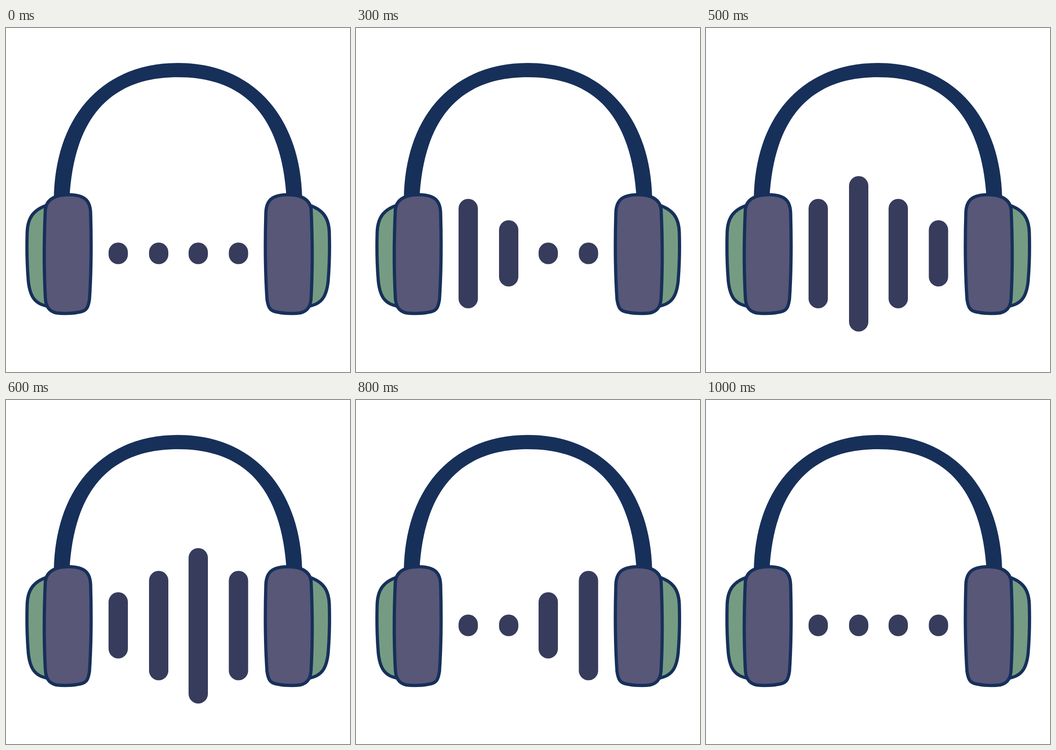
Write an HTML page that moves like this. It is 748 px wide and 748 px high and loops after 1200 ms.

```html
<!DOCTYPE html>
<html lang="en">
<head>
<meta charset="utf-8">
<title>Headphones</title>
<style>
  html, body { margin: 0; width: 100%; height: 100%; overflow: hidden; background: #fff; }
  svg { display: block; width: 100%; height: 100%; }
</style>
</head>
<body>
<svg viewBox="0 0 748 748">
  <path fill="#17305a" d="M104 370C107 188 213 76 374 76S640 190 644 370H610C600 209 533 107 374 107S147 209 138 370Z"/>
  <g id="side" stroke="#17305a" stroke-width="7" stroke-linejoin="round">
    <path fill="#759c82" d="M90 385C60 395 47 412 46 445C45 480 46 520 48.500 550C52 584 63 601 92 605Z"/>
    <path fill="#585778" d="M85.500 395C88 372 108 362.500 137 362.500C166 363 183 371 184 402C186 470 185.500 530 181.500 590C179 606 176 614 163 617C146 621 124 621.500 109 619.500C91 615 86 602 85.500 585C82 520 83 450 85.500 395Z"/>
  </g>
  <use href="#side" transform="translate(749 0) scale(-1 1)"/>
  <g id="bars" fill="#373c5c"></g>
</svg>
<script>
  const STEP = 100, STEPS = 12;
  const heights = [47, 144, 238, 338];
  const centers = [490, 490, 490.5, 491];
  const group = document.getElementById('bars');

  const bars = [223, 311, 397, 484.5].map(x => {
    const bar = document.createElementNS('http://www.w3.org/2000/svg', 'rect');
    bar.setAttribute('x', x);
    bar.setAttribute('width', 42);
    bar.setAttribute('rx', 21);
    group.append(bar);
    return bar;
  });

  // A peak travels right, one bar per step; neighbours fall off by a level each.
  function draw(time) {
    const step = Math.floor(time / STEP) % STEPS;
    bars.forEach((bar, i) => {
      const level = Math.max(0, 3 - Math.abs(step - 4 - i));
      bar.setAttribute('y', centers[level] - heights[level] / 2);
      bar.setAttribute('height', heights[level]);
    });
  }

  const start = performance.now();
  function tick() {
    draw(performance.now() - start);
    requestAnimationFrame(tick);
  }
  tick();
</script>
</body>
</html>
```
